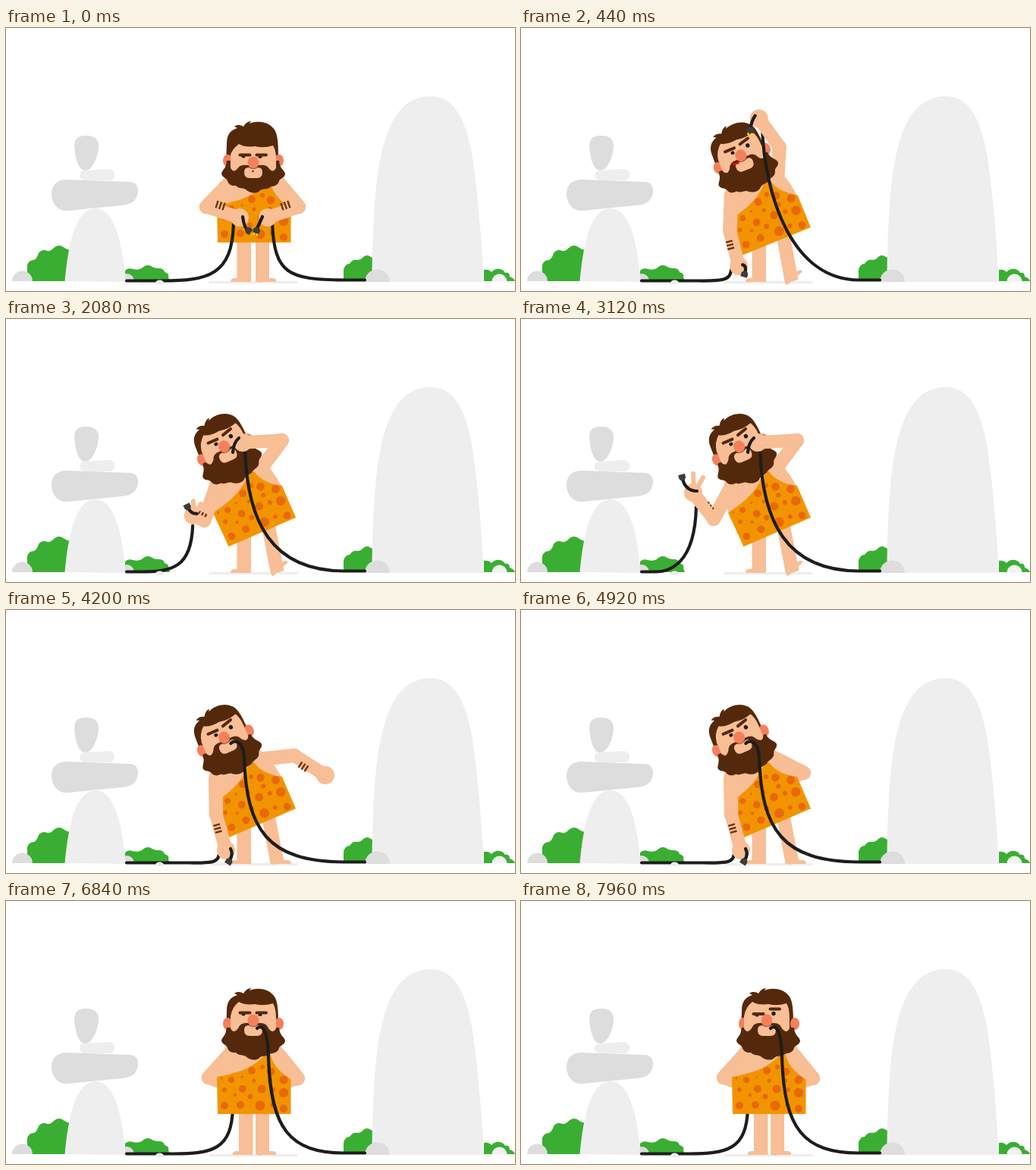
An HTML page with a canvas for the animation above (8000 ms loop, 671x347 px).

```html
<!DOCTYPE html>
<html>
<head>
<meta charset="utf-8">
<style>
html, body { margin: 0; width: 100%; height: 100%; overflow: hidden; background: #fff; }
canvas { display: block; width: 671px; height: 347px; }
</style>
</head>
<body>
<canvas id="stage"></canvas>
<script>
const LOOP = 8000;
const SKIN = '#f8be95', HAIR = '#54290b', CORAL = '#f4805b', BLACK = '#1d1d1b',
  PLUG = '#3c3c3b', GREEN = '#3aae32', PALE = '#eeeeee', GREY = '#dddddd';
const canvas = document.getElementById('stage');
const c = canvas.getContext('2d');
const scale = window.devicePixelRatio || 1;
canvas.width = 671 * scale;
canvas.height = 347 * scale;

const fill = (d, color) => { c.fillStyle = color; c.fill(new Path2D(d)); };
const line = (d, color, width) => {
  c.strokeStyle = color;
  c.lineWidth = width;
  c.stroke(new Path2D(d));
};
const oval = (x, y, rx, ry, color) => {
  c.fillStyle = color;
  c.beginPath();
  c.ellipse(x, y, rx, ry, 0, 0, 7);
  c.fill();
};
const dome = (x, y, r, color) => fill(`M${x - r} ${y}A${r} ${r} 0 0 1 ${x + r} ${y}Z`, color);

// Poses. Arms: elbow and hand. Strand: start, control and tip of the cable end in a hand.
// Cable: where the long part meets the hand. Band: offset from the arm's axis and length.
const hold = {
  lean: 0, bodyY: 2, headY: 6, look: 12, faceX: 0, browL: 147.5, browR: [147.5, 147.5], eyeX: 0, open: 0,
  tongue: 0, mouth: 0, plug: 1, toe: 0, fingers: 0, leftBack: 0, rightBack: 0, legX: 313.5,
  leftArm: [264, 236, 308, 250], rightArm: [386, 236, 345, 250],
  leftStrand: [312, 249, 314, 263, 318, 266], rightStrand: [338, 249, 332, 262, 331, 265],
  leftCable: [300, 258], rightCable: [351, 258], leftBand: [-7.5, 10], rightBand: [7.5, 10]
};
const lift = {
  ...hold, lean: 1, bodyY: 0, headY: 0, look: 0, browL: 145, browR: [143, 139.5], eyeX: 4.5, open: 1,
  tongue: 1, toe: 1, leftArm: [276, 270, 286, 318], rightArm: [338, 152, 312, 112],
  leftStrand: [291, 316, 297, 317, 294, 326], rightStrand: [307, 108, 302, 115, 301, 125],
  leftCable: [276, 322], rightCable: [316, 122], leftBand: [5, 9], rightBand: [0, 0]
};
const bite = {
  ...lift, tongue: 0, plug: 0, rightArm: [364, 160, 312, 163],
  rightStrand: [307, 157, 300, 163, 299, 176], rightCable: [315, 172]
};
const wave = {
  ...bite, fingers: 1, leftArm: [254, 264, 227, 229], leftStrand: [232, 227, 217, 227, 213, 211],
  leftCable: [231, 248], leftBand: [8, 2]
};
const swing = {
  ...bite, mouth: 1, fingers: 0, rightArm: [366, 150, 386, 117], rightCable: [314, 195],
  leftArm: [262, 269, 250, 290], leftStrand: [256, 288, 260, 296, 256, 303], leftCable: [248, 300]
};
const reach = {
  ...swing, toe: 0, leftArm: [277, 270, 290, 317], leftStrand: [296, 315, 300, 322, 295, 330],
  leftCable: [281, 322], leftBand: [3, 9], rightArm: [380, 192, 421, 218], rightBand: [6, 9]
};
const hip = { ...reach, rightArm: [373, 215, 352, 222], rightBand: [0, 0], rightBack: 1 };
const tug = {
  ...hip, leftArm: [276, 270, 275, 319], leftStrand: [282, 318, 286, 321, 289, 330],
  leftCable: [268, 326], leftBand: [7, 9]
};
const rest = {
  ...tug, lean: 0, browL: 147.5, browR: [147.5, 147.5], eyeX: 0, open: 0, leftBack: 1, legX: 316,
  leftArm: [267, 233, 300, 245], rightArm: [385, 234, 350, 245], leftBand: [0, 0],
  leftCable: [299, 274], rightCable: [346, 207]
};
const doubt = { ...rest, faceX: -2, browL: 149, browR: [142.5, 142.5], open: 1, rightCable: [344, 207] };

const keys = [
  [0, hold], [60, hold], [560, lift], [1380, lift], [1660, bite], [1800, bite], [2300, wave], [3240, wave],
  [3560, swing], [3900, reach], [4300, reach], [4800, hip], [5100, hip], [5450, tug], [5930, tug],
  [6400, rest], [7640, rest], [7800, doubt], [LOOP, doubt]
];

const mix = (a, b, k) => Array.isArray(a) ? a.map((v, i) => mix(v, b[i], k)) : a + (b - a) * k;
const ease = k => k < .5 ? 4 * k ** 3 : 1 - (2 - 2 * k) ** 3 / 2;

function poseAt(t) {
  const i = keys.findIndex(([time]) => time > t);
  const [t0, a] = keys[i - 1], [t1, b] = keys[i];
  const k = ease((t - t0) / (t1 - t0));
  return Object.fromEntries(Object.keys(a).map(name => [name, mix(a[name], b[name], k)]));
}

const PIVOT = [327.5, 281], TILT = -23.4 * Math.PI / 180;

function leanBody(p) {
  c.translate(PIVOT[0] + 10.5 * p.lean, PIVOT[1] + p.bodyY);
  c.rotate(TILT * p.lean);
  c.translate(-PIVOT[0], -PIVOT[1]);
}

function bodyPoint(p, x, y) {
  const s = Math.sin(TILT * p.lean), k = Math.cos(TILT * p.lean);
  const dx = x - PIVOT[0], dy = y - PIVOT[1];
  return [PIVOT[0] + 10.5 * p.lean + dx * k - dy * s, PIVOT[1] + p.bodyY + dx * s + dy * k];
}

function inBody(p, draw) {
  c.save();
  leanBody(p);
  draw(p);
  c.restore();
}

function scenery() {
  fill('M28 334V313Q30 306 37 306Q41 304 43 297Q48 291 54 294Q59 295 63 290Q70 284 77 290Q82 294 90 292L100 334Z', GREEN);
  fill('M157 334V320Q161 316 167 318Q174 320 179 317Q185 311 191 314Q195 317 201 317Q208 317 209 322Q216 324 214 329L216 334Z', GREEN);
  dome(159, 334, 10, GREY);
  fill('M77.5 334C82 284 92 238 118 238C143 238 154 284 157.5 335Z', PALE);
  fill('M60 220C60 206 68 200 80 200L162 203C172 203 175 210 174 217C172 228 166 233 152 234L82 241C68 242 61 232 60 220Z', GREY);
  fill('M97 194Q97 188 105 188L134 186Q143 186 143 194Q143 202 134 201H105Q97 201 97 194Z', PALE);
  fill('M90.5 160C89 148 93 142 104 142C116 141 123 147 122 157C121 172 113 188 105 188C96 188 92 175 90.5 160Z', GREY);
  dome(21.5, 334, 13.5, GREY);
  fill('M445 334V319Q447 311 453 311Q457 305 463 306Q468 306 471 302Q476 298 481 302L490 306V334Z', GREEN);
  fill('M630 334V319Q636 318 640 322Q645 317 651 318Q656 319 658 323Q664 322 664 328Q670 330 671 334Z', GREEN);
  fill('M482.5 335C483 270 486 205 494 170C505 118 525 90 560 90C590 90 605 118 614 165C622 215 627 280 630 335Z', PALE);
  dome(489.5, 335, 16.5, GREY);
  dome(650.5, 334.5, 10, '#f2f2f2');
  line('M269 335.5H383', PALE, 3.5);
}

function legs(p) {
  const x = p.legX, hipX = 338 + 7 * p.lean, ankle = 338 + 19.5 * p.lean;
  fill(`M${x - 9} 268H${x + 9.5}V335H${x - 9}Z`, SKIN);
  fill(`M${x + 9} 335H${x - 17.5}Q${x - 17.5} 330 ${x - 12} 330H${x + 9}Z`, SKIN);
  fill(`M${hipX - 9} 268H${hipX + 9}L${ankle + 9} 332L${ankle - 4} 336L${ankle - 9} 334Z`, SKIN);
  c.save();
  c.translate(ankle - 4 + 2 * p.toe, 335 + p.toe);
  c.rotate(-.75 * p.toe);
  fill('M-5 0H22Q23 -5 17 -5H-5Z', SKIN);
  c.restore();
}

const SPOTS = [
  [288, 270, 5], [309, 269, 5], [335, 270, 6.5], [366, 274, 5], [366, 253, 6.2], [366, 236, 5.5], [324, 224, 5],
  [338, 219, 3], [297, 236, 4], [312, 248, 5], [288, 249, 3], [302, 256, 2.2], [322, 258, 3.5], [327, 237, 2.5],
  [337, 248, 5.5], [352, 249, 3], [349, 225, 5.3], [348, 237, 3], [311, 232, 1.5], [284, 234, 1.5], [351, 269, 3]
];

function torso() {
  fill('M296 184H358Q374 205 375 245H278Q278 205 296 184Z', SKIN);
}

function dress() {
  const shape = 'M278 232C300 228 325 222 341 203H349C352 218 364 228 375.5 235V281H279Z';
  fill(shape, '#f29400');
  c.save();
  c.clip(new Path2D(shape));
  SPOTS.forEach(([x, y, r]) => oval(x, y, r, r, '#e8690b'));
  c.restore();
}

function head(p) {
  const L = p.look, cheek = L * .7;
  c.translate(0, p.headY);
  fill('M290 172L291 145C291 132 296 127 305 124L301 122C305 119 310 120 313 122Q317 115 323 115L321 118C334 113 349 117 355 128C359 136 359 150 359 172Z', HAIR);
  for (const x of [292, 360]) oval(x + p.faceX * -.5, 162 + L * .4, 6, 8, CORAL);
  fill('M291 167C290 178 285 179 284 184C285 190 291 189 292 194C294 200 299 200 303 200C308 205 312 202 316 205C320 209 329 212 334 207C338 203 344 206 348 202C352 200 358 201 360 194C361 190 368 190 368 184C366 178 361 178 360 167Z', HAIR);
  c.translate(p.faceX, 0);
  fill(`M296 ${168 + cheek}V${152 + L * .6}Q298 ${140 + L} 307 ${133 + L}Q315 ${138 + L} 328 ${136 + L}Q340 ${139 + L} 352 ${135 + L}Q356 ${142 + L} 356 ${154 + L * .7}V${168 + cheek}Q352 ${176 + cheek} 346 ${168 + cheek}Q343 ${160 + L} 334 ${161 + L}H318Q309 ${160 + L} 306 ${168 + cheek}Q300 ${176 + cheek} 296 ${168 + cheek}Z`, SKIN);
  c.translate(0, L);
  fill('M320 164Q326 168 332 164Q338 164 338 170Q338 178 331 178H321Q314 178 314 170Q314 164 320 164Z', SKIN);
  if (L > 6) oval(325.5, 169, 1.2, 1.2, HAIR);
  if (p.tongue > .5) line('M312.5 164.5L319 165', '#e30613', 3.2);
  const lid = .8 + .6 * p.open;
  oval(313 + p.eyeX, 149 + lid, 2.6, lid + .8, BLACK);
  oval(335 + p.eyeX, 150 - p.open * 1.5 + (1 - p.open) * .3, 2.7, 1.6 + 1.2 * p.open, BLACK);
  line(`M308.5 ${p.browL}H321.5`, HAIR, 4);
  line(`M330.5 ${p.browR[0]}L343 ${p.browR[1]}`, HAIR, 4);
  oval(326, 157.5, 7.5, 8, CORAL);
}

const upperArm = ([sx, sy], [ex, ey]) => line(`M${sx} ${sy}L${ex} ${ey}`, SKIN, 18.5);

function forearm([ex, ey, hx, hy], [offset, length]) {
  line(`M${ex} ${ey}L${hx} ${hy}`, SKIN, 17.5);
  oval(hx, hy, 12, 12, SKIN);
  if (length < .8) return;
  c.save();
  c.translate(ex, ey);
  c.rotate(Math.atan2(hy - ey, hx - ex));
  c.lineCap = 'butt';
  const along = Math.hypot(hx - ex, hy - ey) * .37;
  for (const d of [-4.7, 0, 4.7])
    line(`M${along + d} ${offset - length / 2}V${offset + length / 2}`, '#6b3410', 2.4);
  c.restore();
}

function strand([sx, sy, cx, cy, tx, ty], connector, prongs) {
  line(`M${sx} ${sy}Q${cx} ${cy} ${tx} ${ty}`, BLACK, 4.2);
  if (!connector) return;
  c.save();
  c.translate(tx, ty);
  c.rotate(Math.atan2(ty - cy, tx - cx));
  if (prongs) fill('M5 -3.5H9V-1H5ZM5 1H9V3.5H5Z', '#ffde00');
  fill('M-2 -2.5L1 -4.5H6V4.5H1L-2 2.5Z', PLUG);
  c.restore();
}

function leftCable([x, y]) {
  const h = 333 - y, bend = Math.max(175, x - 30 - h * .9);
  line(`M159 333.5H${bend}C${x - h * .42} 334 ${x - 2} ${333 - h * .1} ${x} ${y}`, BLACK, 4.2);
}

function rightCable(p) {
  const [x, y] = p.rightCable;
  const h = 332 - y, drop = Math.min(h, 105) * .9;
  let start = `M${x} ${y}`;
  if (p.mouth > .05) {
    const [mx, my] = bodyPoint(p, 331 + p.faceX, 168);
    start = `M${mx} ${my}C${mx + 5} ${my - 5} ${x - 1} ${my - 3} ${x} ${y}`;
  }
  line(`${start}C${x + 3} ${y + drop} ${x + 10 + h * .15} 332 445 332.5H473`, BLACK, 4.2);
}

function draw(t) {
  const p = poseAt(t);
  const leftShoulder = bodyPoint(p, 294, 203), rightShoulder = bodyPoint(p, 360, 203);
  const leftBehind = p.leftBack > .5, rightBehind = p.rightBack > .5;
  c.setTransform(scale, 0, 0, scale, 0, 0);
  c.clearRect(0, 0, 671, 347);
  c.lineCap = c.lineJoin = 'round';

  scenery();
  if (leftBehind) leftCable(p.leftCable);
  legs(p);
  if (leftBehind) forearm(p.leftArm, p.leftBand);
  if (rightBehind) forearm(p.rightArm, p.rightBand);
  if (leftBehind) upperArm(leftShoulder, p.leftArm);
  upperArm(rightShoulder, p.rightArm);
  inBody(p, torso);
  inBody(p, dress);
  if (!leftBehind) {
    upperArm(leftShoulder, p.leftArm);
    leftCable(p.leftCable);
  }
  inBody(p, head);

  if (p.mouth <= .05) rightCable(p);
  if (!leftBehind) {
    const [, , hx, hy] = p.leftArm, f = p.fingers;
    forearm(p.leftArm, p.leftBand);
    if (f > .05) line(`M${hx + 1} ${hy - 4}L${hx} ${hy - 6 - 19 * f}M${hx + 4} ${hy - 4}L${hx + 4 + 9 * f} ${hy - 5 - 15 * f}`, SKIN, 6);
    strand(p.leftStrand, true, false);
  }
  if (!rightBehind) forearm(p.rightArm, p.rightBand);
  if (p.mouth > .05) rightCable(p);
  else strand(p.rightStrand, p.plug > .5, true);

  // Pebble in front of the cable
  fill('M196.5 338Q197 332.5 202.5 332.5Q208 332.5 208.5 338Z', PALE);
}

function tick(now) {
  draw(now % LOOP);
  requestAnimationFrame(tick);
}
requestAnimationFrame(tick);
</script>
</body>
</html>
```
